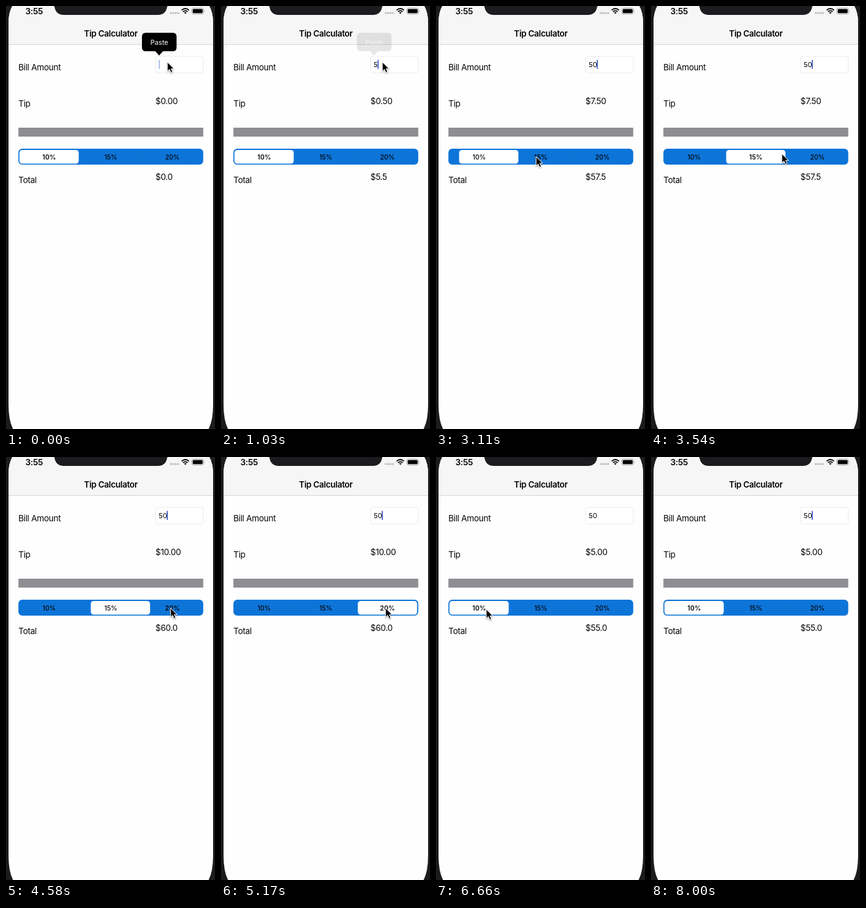
An HTML page for the animation above (8.15 s loop, 329 by 664 pixels).

```html
<!DOCTYPE html>
<html lang="en">
<head>
<meta charset="utf-8">
<title>Tip Calculator</title>
<style>
  html, body { margin: 0; width: 100%; height: 100%; overflow: hidden; background: #1c1c1e; }
  svg { display: block; width: 329px; height: 664px; }
  text { font: 13.2px Inter, "Liberation Sans", sans-serif; letter-spacing: -.33px; fill: #050505; }
  .bold { font-weight: 600; }
  .small { font-size: 10.9px; letter-spacing: -.1px; }
  #labels text { font-size: 10.2px; font-weight: 500; letter-spacing: 0; text-anchor: middle; }
  #labels text.on { font-weight: 600; }
</style>
</head>
<body>
<svg viewBox="0 0 329 664">
  <defs>
    <clipPath id="screen">
      <path d="M10 0Q4 10 4 27V626Q4 650 11 664H319Q326 650 326 626V27Q326 10 320 0Z"/>
    </clipPath>
    <filter id="soft" x="-50%" y="-50%" width="220%" height="220%">
      <feDropShadow dx="0" dy="1.2" stdDeviation="1" flood-opacity=".4"/>
    </filter>
  </defs>
  <rect width="329" height="664" fill="#1c1c1e"/>
  <g clip-path="url(#screen)">
    <rect width="329" height="664" fill="#fefefe"/>
    <rect width="329" height="60" fill="#f6f6f6"/>
    <rect y="60" width="329" height="1" fill="#d6d6d6"/>
  </g>
  <path d="M75 0Q76.500 0 76.500 2C78 10 83 14 91 14H239C247 14 252 10 253.500 2Q253.500 0 255 0Z" fill="#1c1c1e"/>

  <text class="bold" x="30.500" y="12.500">3:55</text>
  <g fill="#b9b9bb">
    <circle cx="259.500" cy="11" r="1.600"/><circle cx="263.300" cy="11" r="1.600"/>
    <circle cx="267.100" cy="11" r="1.600"/><circle cx="270.900" cy="11" r="1.600"/>
  </g>
  <g fill="none" stroke="#080808" stroke-width="1.700">
    <path d="M276.500 6.600Q282.300 1.400 288.100 6.600"/>
    <path d="M278.700 9Q282.300 5.900 285.900 9"/>
    <path d="M280.300 10.300Q282.300 8.600 284.300 10.300L282.300 12.400Z" fill="#080808" stroke="none"/>
  </g>
  <rect x="292.500" y="3.300" width="18.500" height="9.400" rx="2.700" fill="none" stroke="#a0a0a2" stroke-width=".9"/>
  <rect x="293.900" y="4.700" width="15.700" height="6.600" rx="1.500" fill="#050505"/>
  <path d="M312 6.500Q313.400 8 312 9.500Z" fill="#a0a0a2"/>

  <text class="bold" x="165" y="47.700" text-anchor="middle">Tip Calculator</text>
  <text x="19.500" y="101">Bill Amount</text>
  <text x="19.500" y="158">Tip</text>
  <text x="19.500" y="278">Total</text>
  <text id="tip" x="235.300" y="153.800"></text>
  <text id="total" x="235.300" y="272.800"></text>

  <rect x="235.500" y="79" width="75" height="26" rx="3.500" fill="#fff" stroke="#ebebeb"/>
  <text id="bill" class="small" x="240.300" y="95.900"></text>
  <rect id="caret" y="84.500" width="1.700" height="14.300" rx=".6" fill="#3c5cc8"/>

  <rect x="19.500" y="191" width="291" height="14" fill="#8e8d92"/>
  <rect x="19.500" y="224" width="291" height="25" rx="6" fill="#0d74d8"/>
  <rect id="div0" x="116.200" y="231.500" width=".8" height="10" fill="#2866b0" opacity=".45"/>
  <rect id="div1" x="213.200" y="231.500" width=".8" height="10" fill="#2866b0" opacity=".45"/>
  <rect id="thumb" y="226" width="93.300" height="21.600" rx="4.500" fill="#fff"/>
  <g id="labels">
    <text x="68" y="240.500">10%</text>
    <text x="165" y="240.500">15%</text>
    <text x="262" y="240.500">20%</text>
  </g>

  <g id="menu">
    <path d="M220 42H262.500Q268.500 42 268.500 48V65Q268.500 71 262.500 71H247L241 77.800L235 71H220Q214 71 214 65V48Q214 42 220 42Z" fill="#020202"/>
    <text class="small" x="241.200" y="60.600" text-anchor="middle" style="fill:#f4f4f4">Paste</text>
  </g>
  <g id="pointer" filter="url(#soft)">
    <path d="M0 0V14.500L3.300 11.400L5.700 16.600L8.300 15.500L6 10.400H10.500Z" fill="#050505" stroke="#fff" stroke-width="1" stroke-linejoin="round"/>
  </g>
</svg>
<script>
const LOOP = 8150, TICKS = 55, TICK = LOOP / TICKS;
const $ = id => document.getElementById(id);
const labels = [...$("labels").children];
const smooth = k => k * k * (3 - 2 * k);
const clamp = k => Math.max(0, Math.min(1, k));

// pointer stops: tick, x, y, eased
const path = [
  [10, 254, 88], [17, 107, 218, 1], [18, 110, 229], [20, 150, 236], [22, 165, 237],
  [23, 180, 235], [24, 206, 232], [26, 246, 235], [28, 259, 237], [36, 259, 237],
  [41, 81, 238, 1], [43, 79, 239], [46, 79, 239], [51, 100, 634, 1]
];
// bill typed: tick, text, caret x
const typing = [[0, "", 240.4], [6, "5", 246.5], [8, "50", 253]];
// segment taps: tick, segment
const taps = [[0, 0], [21, 1], [31, 2], [42, 0]];
const rates = [10, 15, 20];

const latest = (rows, n) => rows.filter(r => r[0] <= n).pop();

function pointerAt(n) {
  const i = path.findIndex(p => p[0] >= n);
  if (i <= 0) return i ? path[path.length - 1] : path[0];
  const [a, b] = [path[i - 1], path[i]];
  let k = (n - a[0]) / (b[0] - a[0]);
  if (b[3]) k = smooth(k);
  return [n, a[1] + (b[1] - a[1]) * k, a[2] + (b[2] - a[2]) * k];
}

function caretAlpha(n) {
  if (n < 8) return [.45, 0, .5][n] ?? 1;
  return (n * TICK - 600) % 1000 < 310 ? 0 : 1;
}

function thumbAt(n) {
  const tap = latest(taps, n), before = taps[taps.indexOf(tap) - 1] || tap;
  const k = smooth(clamp((n - tap[0] + .5) / 2));
  return before[1] + (tap[1] - before[1]) * k;
}

function draw(n) {
  const [, text, caretX] = latest(typing, n);
  const seg = latest(taps, n)[1];
  const bill = +text, tip = bill * rates[seg] / 100;
  $("bill").textContent = text;
  $("tip").textContent = "$" + tip.toFixed(2);
  $("total").textContent = "$" + (bill + tip).toFixed(1);
  $("caret").setAttribute("x", caretX);
  $("caret").setAttribute("opacity", caretAlpha(n));
  $("menu").setAttribute("opacity", n < 6 ? 1 : [.55, .09][n - 6] ?? 0);

  const pos = thumbAt(n);
  $("thumb").setAttribute("x", 21.2 + 97.1 * pos);
  labels.forEach((label, i) => label.classList.toggle("on", i === seg));
  $("div0").style.display = pos > 1.5 ? "" : "none";
  $("div1").style.display = pos < .5 ? "" : "none";

  const [, x, y] = pointerAt(n);
  $("pointer").setAttribute("transform", `translate(${x} ${y})`);
  $("pointer").style.display = n < 52 ? "" : "none";
}

const start = performance.now();
function frame() {
  const t = (performance.now() - start) % LOOP;
  draw(Math.min(TICKS - 1, Math.floor((t + 18) / TICK)));
  requestAnimationFrame(frame);
}
frame();
</script>
</body>
</html>
```
